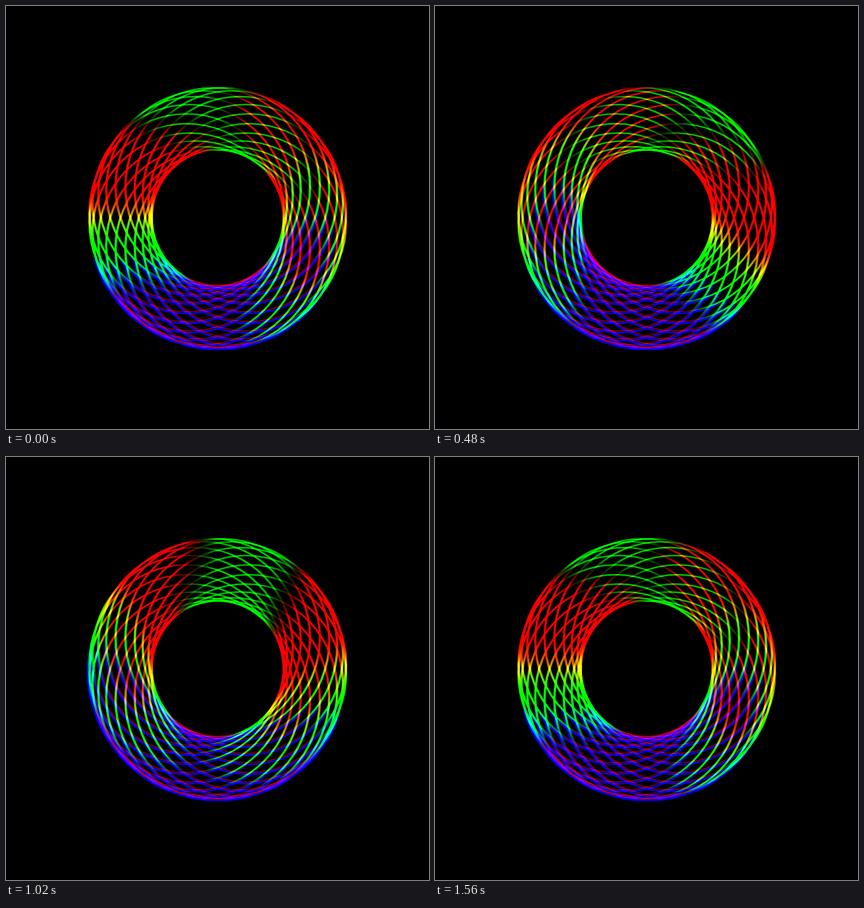
Write an HTML page with a canvas that moves like this. It is 748 px wide and 748 px high and loops after 1620 ms.

```html
<!DOCTYPE html>
<html>
<head>
<meta charset="utf-8">
<style>
  html, body { margin: 0; height: 100%; overflow: hidden; background: #000; }
  canvas { display: block; }
</style>
</head>
<body>
<canvas id="stage" width="748" height="748"></canvas>
<script>
const ctx = document.getElementById('stage').getContext('2d');
const TAU = 2 * Math.PI, DEG = TAU / 360;
const CENTER = 374.4, ORBIT = 55.5, RINGS = 20;
const STEP_MS = 60, STEPS = 27, STEPS_PER_TURN = 13;

const clamp = v => Math.max(0, Math.min(1, v));

// A plateau between two angles with soft edges.
const lobe = (deg, from, to) => clamp((deg - from) / 16 + 0.5) * clamp((to - deg) / 16 + 0.5);

// Light on a ring, by angle from its top (0) to its bottom (180).
const red = deg => 236 * lobe(deg, 36, 96) + 100 * lobe(deg, 140, 220);
const green = deg => 195 * lobe(deg, -24, 24) + 245 * lobe(deg, 90, 133);
const blue = deg => 250 * lobe(deg, 122, 238);

const warm = deg => `rgb(${red(deg)},${green(deg)},0)`;
const cold = deg => `rgb(0,0,${blue(deg)})`;

function ringPaint(x, y, tilt, colorAt) {
  const paint = ctx.createConicGradient(tilt - TAU / 4, x, y);
  for (let deg = 0; deg <= 360; deg += 6)
    paint.addColorStop(deg / 360, colorAt(Math.min(deg, 360 - deg)));
  return paint;
}

// The band is thicker at its sides than at top and bottom.
function ring(x, y, grow, paint) {
  const rx = 172 + grow, ry = 175 + grow;
  ctx.beginPath();
  ctx.ellipse(x, y, rx + 2, ry + 1.3, 0, 0, TAU);
  ctx.closePath();
  ctx.moveTo(x + rx - 2, y);
  ctx.ellipse(x, y, rx - 2, ry - 1.3, 0, 0, TAU);
  ctx.fillStyle = paint;
  ctx.fill('evenodd');
}

function draw(now) {
  const step = Math.floor(now / STEP_MS) % STEPS;
  const phase = step / STEPS_PER_TURN * TAU;
  const sway = 11 - 8 * Math.cos(phase);
  ctx.globalCompositeOperation = 'source-over';
  ctx.fillStyle = '#000';
  ctx.fillRect(0, 0, 748, 748);
  ctx.globalCompositeOperation = 'lighter';
  for (let i = 0; i < RINGS; i++) {
    const angle = (i + 0.5) / RINGS * TAU;
    const x = CENTER + ORBIT * Math.cos(angle);
    const y = CENTER + ORBIT * Math.sin(angle);
    const tilt = (sway + 20 * Math.sin(angle - phase)) * DEG;
    ring(x, y, 0, ringPaint(x, y, tilt, warm));
    ring(x, y, 3, ringPaint(x, y, tilt, cold));
  }
  requestAnimationFrame(draw);
}
draw(0);
</script>
</body>
</html>
```
